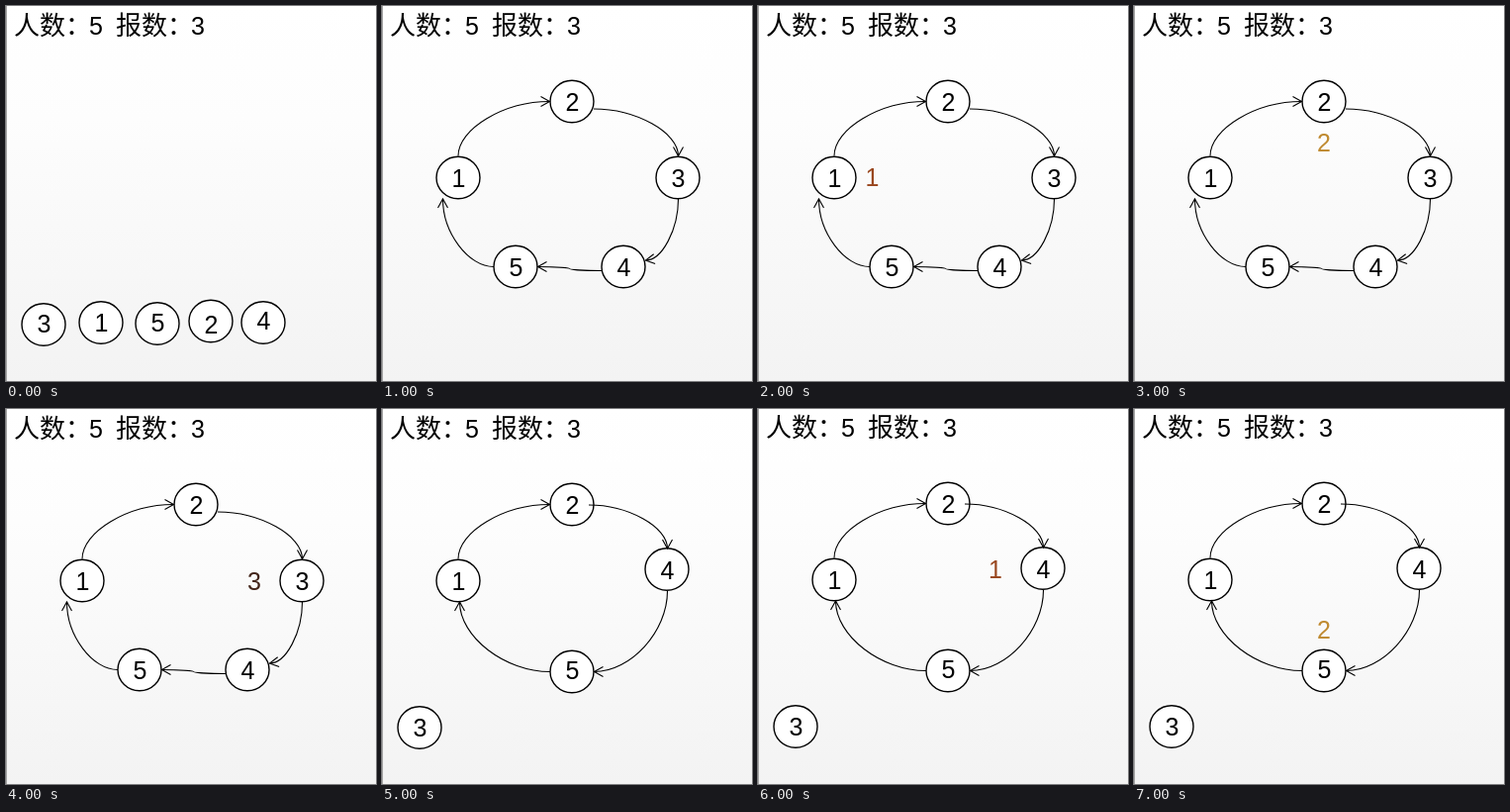
Animation, 374 px wide and 379 px high, one loop 8 s. Source, as an HTML page with a canvas:

```html
<!DOCTYPE html>
<html lang="zh-CN">
<head>
<meta charset="utf-8">
<title>报数出圈</title>
<style>
  html, body { margin: 0; width: 100%; height: 100%; overflow: hidden; background: #fff; }
  canvas { display: block; }
</style>
</head>
<body>
<canvas id="stage" width="374" height="379"></canvas>
<script>
const ctx = document.getElementById('stage').getContext('2d');
const W = 374, H = 379, LOOP = 8000, STEP = 1000;
const INK = '#000';
const BROWN = '#99471f', GOLD = '#bf8a30', DARK = '#43251a';

// Each node: digit, centre x, centre y, optional vertical offset of its digit.
const row = [[3, 38, 322, -1], [1, 96, 320], [5, 153, 321, -1], [2, 207, 318.5, 3], [4, 260, 320, -2]];
const five = [[1, 77, 173.5, .5], [2, 192, 96.5, .5], [3, 299, 173.5, .5], [4, 244, 263.5], [5, 135, 263.5]];
const four = [[1, 77, 173.5, .5], [2, 192, 96.5, .5], [4, 288, 162, .5], [5, 192, 265.5, -2], [3, 38, 322, -.5]];

// Each link: start, end, and shape: 'v' leaves vertically, 'h' horizontally, 's' is a double bend.
const up = [77, 151.5, 169.5, 96.5, 'v'];
const fiveLinks = [up, [214, 104, 299.5, 151.5, 'h'], [299.5, 195, 266.5, 257, 'v'],
  [222, 267.5, 157.5, 263.5, 's'], [113, 263.5, 61.5, 195, 'h']];
const fourLinks = [up, [209, 97, 288.5, 141, 'h'], [288.5, 184, 214.5, 265.5, 'v'], [170, 265.5, 78.5, 195, 'h']];

const ring5 = { nodes: five, links: fiveLinks };
const ring4 = { nodes: four, links: fourLinks };
const scenes = [
  { nodes: row, links: [] },
  ring5,
  { ...ring5, call: [1, 115.5, 172.5, BROWN] },
  { ...ring5, call: [2, 192, 138, GOLD] },
  { ...ring5, call: [3, 251, 174, DARK] },
  ring4,
  { ...ring4, call: [1, 240, 163, BROWN], lift: 1 },
  { ...ring4, call: [2, 192, 224, GOLD], lift: 1 },
];

function digit(n, x, y, color = INK) {
  ctx.font = '25px "Liberation Sans", Arial, sans-serif';
  ctx.textAlign = 'center';
  ctx.fillStyle = color;
  ctx.fillText(n, x, y + 9);
}

function header() {
  ctx.font = '26px "Noto Sans CJK SC", "Noto Sans CJK", sans-serif';
  ctx.textAlign = 'left';
  ctx.fillStyle = INK;
  ctx.fillText('人数：', 8, 29);
  ctx.fillText('报数：', 111, 29);
  digit(5, 91, 19.5);
  digit(3, 194, 19.5);
}

function node([n, x, y, dy = 0]) {
  ctx.beginPath();
  ctx.ellipse(x, y, 22, 21.2, 0, 0, Math.PI * 2);
  ctx.fillStyle = '#fff';
  ctx.fill();
  ctx.lineWidth = 1.4;
  ctx.stroke();
  digit(n, x + .5, y + dy);
}

function arrowHead(x, y, angle) {
  const back = 9, half = 5;
  ctx.save();
  ctx.translate(x, y);
  ctx.rotate(angle);
  ctx.beginPath();
  ctx.moveTo(-back, -half);
  ctx.lineTo(0, 0);
  ctx.lineTo(-back, half);
  ctx.stroke();
  ctx.restore();
}

function link([x0, y0, x1, y1, shape]) {
  const mx = (x0 + x1) / 2, my = (y0 + y1) / 2;
  let fromX = mx, fromY = y1;
  ctx.lineWidth = 1.1;
  ctx.beginPath();
  ctx.moveTo(x0, y0);
  if (shape === 's') {
    ctx.bezierCurveTo((x0 + mx) / 2, y0, mx, (y0 + my) / 2, mx, my);
    ctx.bezierCurveTo(mx, (my + y1) / 2, (mx + x1) / 2, y1, x1, y1);
  } else if (shape === 'v') {
    ctx.bezierCurveTo(x0, my, mx, y1, x1, y1);
  } else {
    ctx.bezierCurveTo(mx, y0, x1, my, x1, y1);
    fromX = x1;
    fromY = my;
  }
  ctx.stroke();
  // Short links bend within the head, so the head leans a little.
  const lean = shape === 'v' && Math.abs(x1 - x0) < 40 ? -.15 : 0;
  arrowHead(x1, y1, Math.atan2(y1 - fromY, x1 - fromX) + lean);
}

const backdrop = ctx.createLinearGradient(0, 0, 0, H);
backdrop.addColorStop(0, '#fff');
backdrop.addColorStop(.3, '#fdfdfd');
backdrop.addColorStop(1, '#f3f3f3');

function draw(time) {
  const { nodes, links, call, lift = 0 } = scenes[Math.floor(time % LOOP / STEP)];
  ctx.fillStyle = backdrop;
  ctx.fillRect(0, 0, W, H);
  ctx.fillStyle = '#a6a6a6';
  ctx.fillRect(0, 0, 1, H);
  ctx.strokeStyle = INK;
  ctx.save();
  ctx.translate(0, -lift);
  header();
  nodes.forEach(node);
  links.forEach(link);
  if (call) digit(...call);
  ctx.restore();
}

const start = performance.now();
function tick() {
  draw(performance.now() - start);
  requestAnimationFrame(tick);
}
tick();
</script>
</body>
</html>
```
